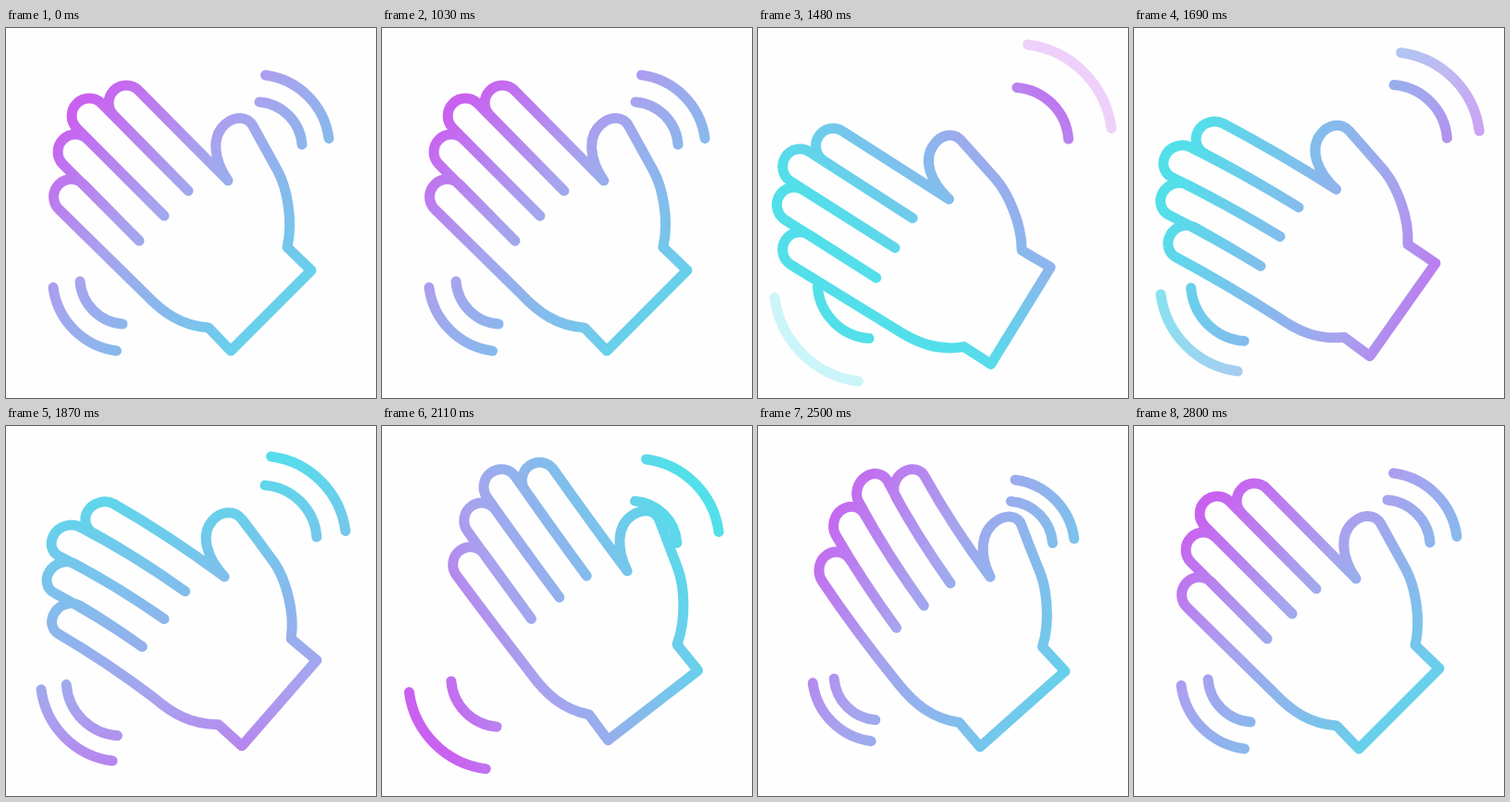
Recreate the animation shown at these times as an HTML page. Size 400 px wide and 400 px high, loop 2830 ms.

```html
<!DOCTYPE html>
<html lang="en">
<head>
<meta charset="utf-8">
<title>Waving hand</title>
<style>
  html, body { margin: 0; width: 100%; height: 100%; overflow: hidden; background: #fefefe; }
  svg { display: block; width: 100vw; height: 100vh; }
</style>
</head>
<body>
<svg viewBox="0 0 400 400">
  <defs>
    <linearGradient id="tint" gradientUnits="userSpaceOnUse">
      <stop offset="0" stop-color="#c961f0"/>
      <stop offset=".35" stop-color="#a8a2ee"/>
      <stop offset="1" stop-color="#52dfea"/>
    </linearGradient>
  </defs>
  <g fill="none" stroke="url(#tint)" stroke-width="11" stroke-linecap="round" stroke-linejoin="round">
    <path id="outer"/>
    <path id="inner"/>
    <path id="hand"/>
  </g>
</svg>
<script>
const LOOP = 2830;
const KEYS = [1010, 1480, 1870, 2110, 2500, 2800];
const el = id => document.getElementById(id);
const rad = deg => deg * Math.PI / 180;

// Smooth curve through the keys, flat at every turning point.
function track(values, times = KEYS) {
  const last = times.length - 1;
  const rate = i => (values[i + 1] - values[i]) / (times[i + 1] - times[i]);
  const slope = values.map((_, i) => {
    if (i === 0 || i === last) return 0;
    const a = rate(i - 1), b = rate(i);
    return a * b > 0 ? 2 * a * b / (a + b) : 0;
  });
  return t => {
    if (t <= times[0]) return values[0];
    if (t >= times[last]) return values[last];
    let i = 0;
    while (t > times[i + 1]) i++;
    const span = times[i + 1] - times[i], p = (t - times[i]) / span, q = 1 - p;
    return q * q * (1 + 2 * p) * values[i] + p * p * (1 + 2 * q) * values[i + 1]
      + span * p * q * (q * slope[i] - p * slope[i + 1]);
  };
}

const BEND_KEYS = [1010, 1250, 1480, 1870, 2110, 2500, 2800];
const OUT_KEYS = [1010, 1480, 1530, 1610, 1870, 2110, 2500, 2800];
const IN_KEYS = [1010, 1480, 1660, 1870, 2110, 2500, 2800];
const motion = {
  turn: track([0, -13.4, -3.9, 7.2, 3.3, 0]),
  bend: track([0, 13, 1.5, -16.5, 3, 15.5, 0], BEND_KEYS),
  wristX: track([286.5, 284, 295.5, 293, 286, 286.5]),
  wristY: track([305.5, 311, 299.5, 302, 306, 305.5]),
  tintX: track([211, 240, 200, 195, 216, 211]),
  tintY: track([211, 160, 232, 201, 209, 211]),
  tintSize: track([182, 148, 200, 168, 190, 182]),
  tintAngle: track([45, 135, 263, 338, 389, 405]),
  outerLeft: track([1, 1.32, 1.37, 1.28, 1.126, 1.21, .92, 1], OUT_KEYS),
  outerRight: track([1, 1.32, 1.37, 1.28, 1.175, 1.146, .93, 1], OUT_KEYS),
  innerLeft: track([1, 1.21, 1.25, 1.2, 1.07, .97, 1], IN_KEYS),
  innerRight: track([1, 1.21, 1.25, 1.215, .985, .98, 1], IN_KEYS),
  outerFade: track([1, .3, 0, 0, 1], [1330, 1480, 1540, 1555, 1760])
};

// Builds a stroke out of cubic segments so that every part can bend.
function stroke(x, y) {
  const points = [[x, y]];
  const pen = {
    points,
    line(x1, y1) {
      const [x0, y0] = points[points.length - 1];
      const at = p => [x0 + (x1 - x0) * p, y0 + (y1 - y0) * p];
      points.push(at(1 / 3), at(2 / 3), [x1, y1]);
      return pen;
    },
    curve(...c) {
      for (let i = 0; i < c.length; i += 2) points.push([c[i], c[i + 1]]);
      return pen;
    },
    tip(cx, cy) {
      const r = 13.4, k = 7.4;
      return pen.line(cx + r, cy - r)
        .curve(cx + r - k, cy - r - k, cx - r + k, cy - r - k, cx - r, cy - r)
        .curve(cx - r - k, cy - r + k, cx - r - k, cy + r - k, cx - r, cy + r);
    }
  };
  return pen;
}

const handStrokes = [
  stroke(240, 165).tip(130, 81).line(197, 176),
  stroke(197, 176).tip(90, 95).line(171, 203),
  stroke(171, 203).tip(75, 134).line(144, 230),
  stroke(144, 230).tip(70.5, 182.5).line(151, 288)
    .curve(170, 308, 190, 322, 219, 324)
    .line(243, 349).line(330, 262).line(304, 237)
    .curve(311, 207, 303, 172, 294, 155).line(267, 106)
    .curve(261, 95, 247, 95, 237, 104, 222, 117, 224, 142, 240, 165)
].map(pen => pen.points);

// Bends a point along the hand's axis, then turns it about the wrist.
function posePoint([x, y], pose) {
  const reach = 288;
  const v = (592 - x - y) * Math.SQRT1_2, u = (x - y + 19) * Math.SQRT1_2;
  const angle = pose.bend * (v / reach) ** 2;
  const across = u + angle * v / 3;
  const along = v * (1 - angle * angle / 6) - .6 * u * Math.sin(angle);
  const c = Math.cos(pose.turn - Math.PI / 4), s = Math.sin(pose.turn - Math.PI / 4);
  return [pose.x + across * c + along * s, pose.y + across * s - along * c];
}

function handPath(t) {
  const pose = {
    turn: rad(motion.turn(t)), bend: rad(motion.bend(t)),
    x: motion.wristX(t), y: motion.wristY(t)
  };
  return handStrokes.map(points => points.map((p, i) =>
    (i === 0 ? "M" : i === 1 ? "C" : "") + posePoint(p, pose).map(n => n.toFixed(2)).join(" ")
  ).join(" ")).join("");
}

// A pair of facing arcs, each growing from its own anchor off the stage centre.
function arcs(near, far, radius, left, right) {
  const anchor = 46;
  const arc = (scale, side) => {
    const place = n => side * (anchor + (n - anchor) * scale);
    const at = (x, y) => `${200 + place(x)} ${200 - place(y)}`;
    const r = radius * scale;
    return `M${at(near, far)}A${r} ${r} 0 0 1 ${at(far, near)}`;
  };
  return arc(right, 1) + arc(left, -1);
}

function draw(t) {
  el("hand").setAttribute("d", handPath(t));
  el("outer").setAttribute("d", arcs(80.5, 149, 79.5, motion.outerLeft(t), motion.outerRight(t)));
  el("outer").setAttribute("opacity", motion.outerFade(t));
  el("inner").setAttribute("d", arcs(74, 120, 50, motion.innerLeft(t), motion.innerRight(t)));

  const a = rad(motion.tintAngle(t)), size = motion.tintSize(t);
  const dx = size * Math.cos(a), dy = size * Math.sin(a);
  const x = motion.tintX(t), y = motion.tintY(t);
  const ends = { x1: x - dx, y1: y - dy, x2: x + dx, y2: y + dy };
  for (const name in ends) el("tint").setAttribute(name, ends[name]);
}

const start = performance.now();
function tick() {
  draw((performance.now() - start) % LOOP);
  requestAnimationFrame(tick);
}
tick();
</script>
</body>
</html>
```
